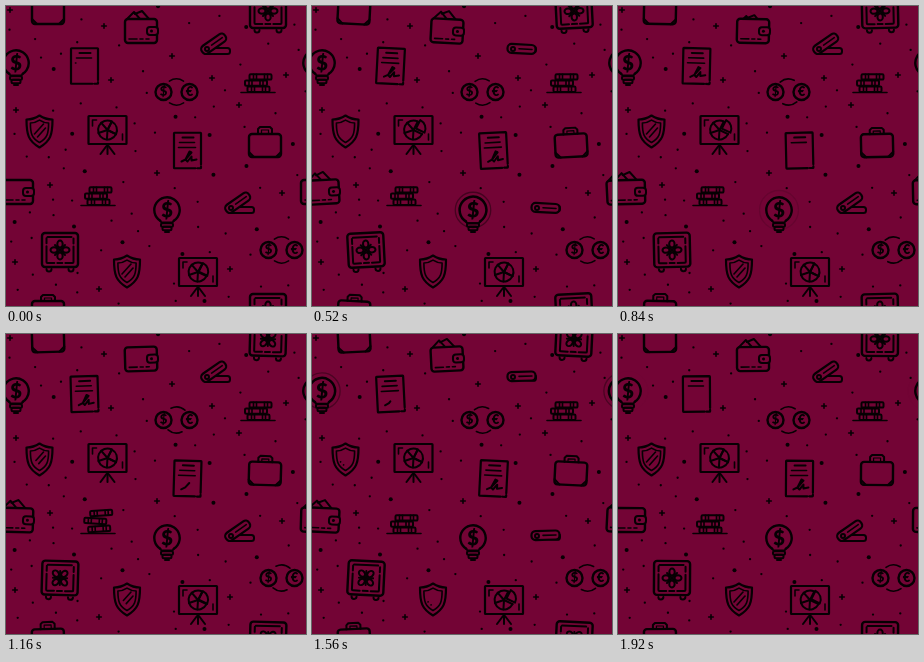
Animation, 300 px wide and 300 px high, one loop 1.96 s. Source, as an HTML page with a canvas:

```html
<!DOCTYPE html>
<html lang="en">
<head>
<meta charset="utf-8">
<title>Finance pattern</title>
<style>
html, body { margin: 0; width: 100%; height: 100%; overflow: hidden; background: #730435; }
canvas { display: block; width: 300px; height: 300px; }
</style>
</head>
<body>
<canvas id="stage"></canvas>
<script>
const SIZE = 300, LOOP = 1960, STEP = 40, HALF = LOOP / 2, TAU = Math.PI * 2;
const BG = '#730435', INK = '#060003';
const THIN = 1.6, MID = 2, BOLD = 2.4;
const canvas = document.getElementById('stage');
const c = canvas.getContext('2d');
const ratio = window.devicePixelRatio || 1;
canvas.width = canvas.height = SIZE * ratio;

const clamp = v => Math.max(0, Math.min(1, v));
const ease = v => v * v * (3 - 2 * v);
const ramp = (t, a, b) => ease(clamp((t - a) / (b - a)));
const pulse = (t, a, b, d, e) => ramp(t, a, b) - ramp(t, d, e);
const rock = t => 3 * Math.sin(TAU * t / LOOP);

function at(x, y, deg, draw, scale = 1) {
  c.save();
  c.translate(x, y);
  c.rotate(deg * Math.PI / 180);
  c.scale(scale, scale);
  draw();
  c.restore();
}
function line(points, width = MID) {
  c.lineWidth = width;
  c.beginPath();
  for (let i = 0; i < points.length; i += 2) c.lineTo(points[i], points[i + 1]);
  c.stroke();
}
// Rounded box centred on x, y.
function box(x, y, w, h, r = 1, width = BOLD, solid = false) {
  c.lineWidth = width;
  c.beginPath();
  c.roundRect(x - w / 2, y - h / 2, w, h, r);
  if (solid) { c.fillStyle = BG; c.fill(); c.fillStyle = INK; }
  c.stroke();
}
function ring(x, y, r, width = MID, a = 0, b = TAU) {
  c.lineWidth = width;
  c.beginPath();
  c.arc(x, y, r, a, b);
  c.stroke();
}
function disc(x, y, r) {
  c.beginPath();
  c.arc(x, y, r, 0, TAU);
  c.fill();
}
function dashed(pattern, draw) {
  c.setLineDash(pattern);
  draw();
  c.setLineDash([]);
}
function sign(text, x, y, size) {
  c.font = `900 ${size}px Lato, "Liberation Sans", sans-serif`;
  c.fillText(text, x, y);
}
// Draws the part of a line between two fractions of its length.
function written(points, from, to, width = MID) {
  let total = 0;
  for (let i = 2; i < points.length; i += 2)
    total += Math.hypot(points[i] - points[i - 2], points[i + 1] - points[i - 1]);
  const shown = (to - from) * total;
  if (shown < .1) return;
  c.lineDashOffset = -from * total;
  dashed([shown, total * 2], () => line(points, width));
  c.lineDashOffset = 0;
}

function briefcase(t) {
  at(0, 0, rock(t), () => {
    const lift = pulse(t, 560, 800, 1300, 1560);
    box(0, 2.5, 32, 23, 3);
    line([-7, -9, -7, -13 - lift, -5, -15 - lift, 5, -15 - lift, 7, -13 - lift, 7, -9]);
    line([-3.5, -10, -3.5, -12 - lift, 3.5, -12 - lift, 3.5, -10], 1.2);
    for (const side of [-1, 1]) line([side * 16, 9, side * 11, 14], MID);
  });
}

function wallet(t) {
  at(0, 0, -rock(t), () => {
    const out = pulse(t, 160, 400, 1740, 1920);
    c.save();
    c.beginPath();
    c.rect(-20, -30, 40, 18);
    c.clip();
    c.translate(0, 10 * (1 - out));
    line([-14, -12, -7, -19, -1, -12]);
    line([-6, -17, 1, -20, 8, -12]);
    c.restore();
    box(0, 0, 32, 24, 3);
    box(11.5, 0, 11, 8, 3, MID, true);
    disc(10.5, 0, 1.5);
    dashed([8, 3, 3, 3], () => line([-12, 8, 8, 8], THIN));
  });
}

function safe(t) {
  at(0, 0, -rock(t), () => {
    box(0, 0, 36, 34, 3);
    dashed([24, 3, 5, 3], () => box(0, 0, 27, 26, 1, MID));
    for (const x of [-11, 11]) ring(x, 19, 2.5, MID, 0, Math.PI);
    const turn = 45 * pulse(t, 900, 1140, 1600, 1860);
    for (let i = 0; i < 4; i++) {
      at(0, 0, turn + i * 90, () => {
        c.lineWidth = MID;
        c.beginPath();
        c.ellipse(0, -6, 2.7, 3.5, 0, 0, TAU);
        c.stroke();
        line([0, 0, 5, 5], MID);
      });
    }
  });
}

function bulb(t) {
  const glow = clamp((t - 240) / 720);
  if (glow > 0 && glow < 1) {
    c.save();
    c.globalAlpha = .7 * (1 - glow);
    ring(0, -4, 14 + 6 * Math.sqrt(glow), 1.3);
    c.restore();
  }
  at(0, -4, 0, () => {
    ring(0, 0, 12.7, BOLD, Math.PI * .68, Math.PI * 2.32);
    line([-7, 10.5, -5.5, 12.5, 5.5, 12.5, 7, 10.5]);
    sign('$', 0, .5, 20);
  }, 1 + .08 * pulse(t, 160, 320, 400, 720));
  box(0, 11, 12, 3.5, 1.5, MID);
  box(0, 14.5, 9, 3.5, 1.5, MID);
  line([-2, 18, 2, 18], MID);
}

function paper(t) {
  at(0, 0, -rock(t), () => {
    dashed([58, 2, 5, 2], () => box(0, 0, 27, 35.5, .5, 2.2));
    // Counted from the moment the old signature has gone.
    const p = (t + LOOP - 600) % LOOP;
    line([-5, -13, 6, -13]);
    line([-8, -8, 7, -8], THIN);
    written([-9, -3, 8, -3], 0, ramp(p, 360, 580), THIN);
    const ink = pulse(p, 480, 730, LOOP - 80, LOOP);
    written([-6, 11, -2, 9, 4, 2, 2, 1, -2, 9, 0, 11, 4, 6, 4, 10, 9, 9], 0, ink);
  });
}

function stapler(t) {
  const open = 1 - pulse(t % HALF, 180, 480, 520, 800);
  at(2, 7 - 2 * (1 - open), 3 * (1 - open), () => box(0, 0, 26, 6, 2.5, MID));
  at(-8, 5, 3 - 38 * open, () => {
    box(8.5, -.5, 28, 9, 4, 2.2, true);
    line([6, -.5, 19, -.5], THIN);
  });
  ring(-8, 5, 2, MID);
}

function coins(t) {
  const swing = .15 * Math.sin(TAU * t / HALF);
  for (const turn of [0, Math.PI])
    ring(0, 0, 13, THIN, turn - 2.15 + swing, turn - 1 + swing);
  for (const [mark, x] of [['$', -13], ['€', 13]]) {
    ring(x, 0, 8, BOLD);
    sign(mark, x, .5, 13);
  }
}

function books(t) {
  const hop = pulse(t, 40, 260, 320, 520);
  line([-17, 10, 17, 10], THIN);
  [.5, -2, 2.5].forEach((x, i) => {
    const side = i % 2 ? -1 : 1;
    at(x + hop * side, 6.8 - i * 6.2 - hop * (2 + i * 2.5), -5 * hop * side, () => {
      box(0, 0, 22, 5.4, 1.2, MID);
      for (const mark of [-7, -4, 4, 7]) line([mark, -2.5, mark, 2.5], THIN);
    });
  });
}

function crest(s, width) {
  c.lineWidth = width;
  at(0, 0, 0, () => {
    c.beginPath();
    c.moveTo(0, -15.5 * s);
    for (const k of [1, -1]) {
      if (k > 0) {
        c.quadraticCurveTo(-6 * s, -11.5 * s, -13 * s, -11.5 * s);
        c.bezierCurveTo(-13 * s, 4 * s, -11 * s, 10 * s, 0, 16.5 * s);
      } else {
        c.bezierCurveTo(11 * s, 10 * s, 13 * s, 4 * s, 13 * s, -11.5 * s);
        c.quadraticCurveTo(6 * s, -11.5 * s, 0, -15.5 * s);
      }
    }
    c.closePath();
    c.stroke();
  });
}
function shield(t) {
  const p = t % HALF;
  crest(1, 2.2);
  crest(.7, THIN);
  const leaving = p < 540;
  const from = leaving ? ramp(p, 80, 480) : 0;
  const to = leaving ? 1 : ramp(p, 560, 820);
  written([-5, 3, 4, -7], from, to, THIN);
  written([-2, 6, 6, -3], from, to, THIN);
}

function board(t) {
  const out = pulse(t, 100, 350, 800, 1080);
  const r = 9.5, a = -1.1, b = .45;
  box(0, -4, 38, 28, .5, 2.2);
  line([0, 10, 0, 20]);
  for (const side of [-1, 1]) line([side, 12, side * 7, 20]);
  line([-15, -8, -15, -14, -11, -14], THIN);
  line([15, 0, 15, 6], THIN);
  at(0, -4, 0, () => {
    ring(0, 0, r, MID, b, TAU + a);
    for (let i = 0; i < 5; i++) {
      const spoke = b + i * (TAU + a - b) / 4;
      line([0, 0, r * Math.cos(spoke), r * Math.sin(spoke)]);
    }
    at(2.5 * out, -1.5 * out, 0, () => {
      c.beginPath();
      c.moveTo(0, 0);
      c.arc(0, 0, r, a, b);
      c.closePath();
      c.stroke();
    });
  });
}

// Drawing, place of the first copy, place of the second, their time shifts.
const icons = [
  [briefcase, [42, 4], [259, 137], 0, HALF],
  [wallet, [135, 25], [11, 186], HALF, 0],
  [safe, [262, 5], [54, 244], 0, 0],
  [bulb, [10, 61], [161, 208], HALF, 0],
  [paper, [78.5, 60], [181.5, 144.5], HALF, 0],
  [stapler, [209, 38], [233, 197], 0, 0],
  [coins, [170.5, 86], [275.5, 244], 0, HALF],
  [books, [252, 76.5], [92, 189.5], 0, HALF],
  [shield, [33.5, 125], [121, 265], 0, 0],
  [board, [101.5, 128], [192, 270], 0, HALF]
];
const pluses = [[4, 4], [98, 20], [166, 50], [105, 74], [206, 72], [280, 69], [10, 104],
  [233, 99], [151, 167], [44, 179], [276, 187], [9, 256], [224, 263], [93, 283]];

let seed = 11;
const random = () => (seed = seed * 16807 % 2147483647) / 2147483647;
const gap = (a, b) => {
  const wrap = d => Math.min(Math.abs(d), SIZE - Math.abs(d));
  return Math.hypot(wrap(a[0] - b[0]), wrap(a[1] - b[1]));
};
// Scatters points evenly: the best of several tries, clear of the icons.
function scatter(count) {
  const homes = icons.flatMap(icon => [icon[1], icon[2]]);
  const points = [];
  while (points.length < count) {
    let best, most = -1;
    for (let i = 0; i < 30; i++) {
      const spot = [random() * SIZE, random() * SIZE];
      if (homes.some(h => gap(h, spot) < 24)) continue;
      const room = Math.min(...[...pluses, ...points].map(p => gap(p, spot)));
      if (room > most) { most = room; best = spot; }
    }
    if (best) points.push(best);
  }
  return points;
}
const specks = scatter(80);

function render(t) {
  c.setTransform(ratio, 0, 0, ratio, 0, 0);
  c.fillStyle = BG;
  c.fillRect(0, 0, SIZE, SIZE);
  c.fillStyle = c.strokeStyle = INK;
  c.lineCap = c.lineJoin = 'round';
  c.textAlign = 'center';
  c.textBaseline = 'middle';
  specks.forEach(([x, y], i) => disc(x, y, i < 16 ? 2 : 1.15));
  for (const [x, y] of pluses) {
    line([x - 2.3, y, x + 2.3, y], THIN);
    line([x, y - 2.3, x, y + 2.3], THIN);
  }
  for (const [draw, first, second, shiftA, shiftB] of icons) {
    for (const [[x, y], shift] of [[first, shiftA], [second, shiftB]]) {
      // Icons that cross an edge come back on the opposite side.
      for (const dx of x < 25 ? [0, SIZE] : [0])
        for (const dy of y < 30 ? [0, SIZE] : [0])
          at(x + dx, y + dy, 0, () => draw((t + shift) % LOOP));
    }
  }
}

const start = performance.now();
function tick() {
  const t = (performance.now() - start) % LOOP;
  render(Math.floor(t / STEP) * STEP);
  requestAnimationFrame(tick);
}
tick();
</script>
</body>
</html>
```
